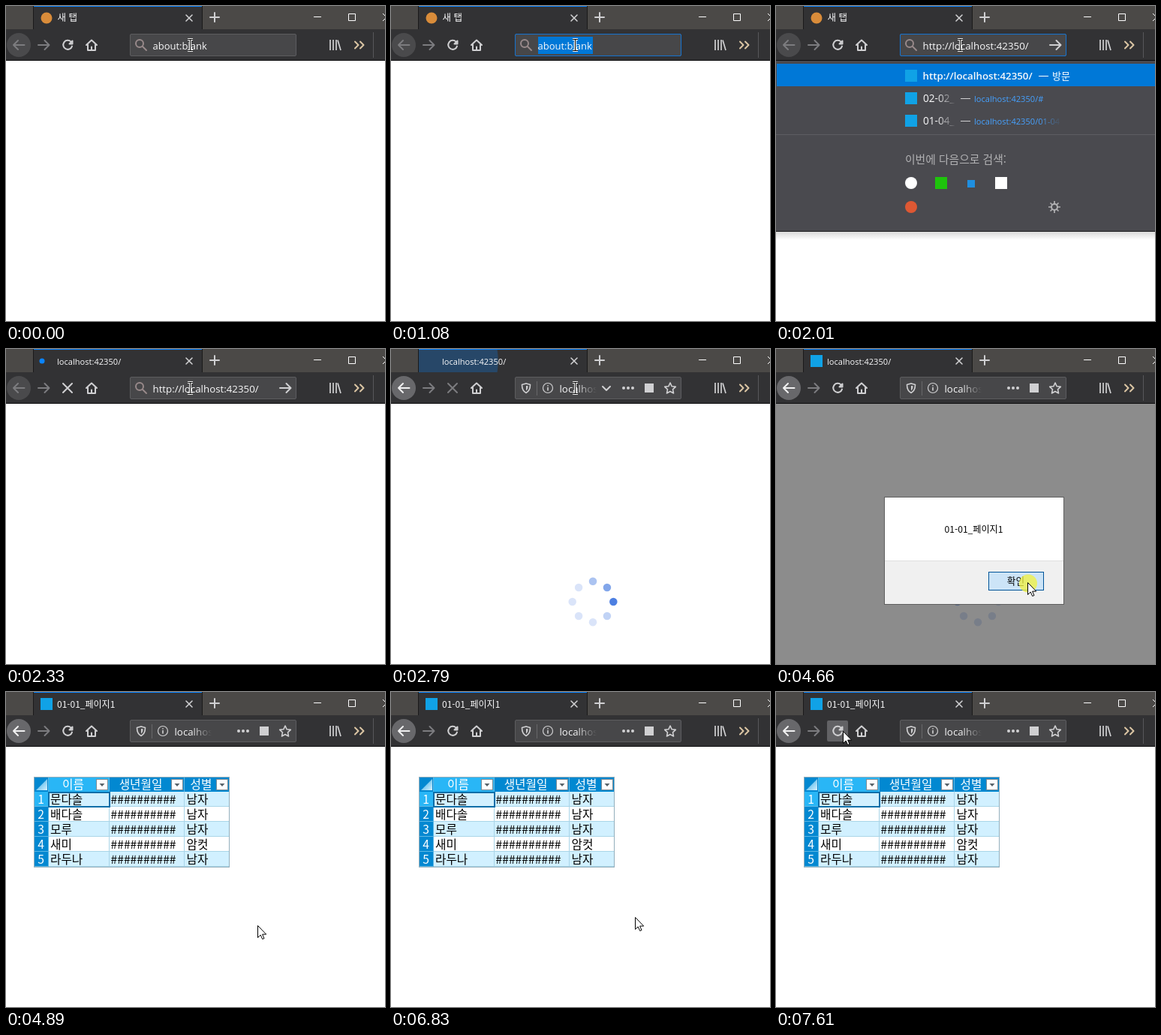
Animation of 505x420 px, one loop 8 s. Source, as an HTML page:

```html
<!DOCTYPE html>
<html lang="ko">
<head>
<meta charset="utf-8">
<title>Browser demo</title>
<style>
  html, body { margin: 0; width: 100%; height: 100%; overflow: hidden; background: #fff; }
  svg { display: block; }
  text { font-family: "Noto Sans CJK KR", "Noto Sans CJK", sans-serif; white-space: pre; }
  .url { font: 13px "Open Sans", "Noto Sans", sans-serif; fill: #f9f9fa; }
  .addr { font-size: 13.3px; }
  .small { font: 11.1px "Open Sans", "Noto Sans", sans-serif; }
  .tab { font-size: 12px; fill: #f9f9fa; }
  .tab.small { font-size: 11.1px; }
  .icon { fill: none; stroke: #d0d0d2; stroke-width: 2; stroke-linecap: round; stroke-linejoin: round; }
  .dim { stroke: #7c7c7f; }
  .brand { fill: #10a2e6; }
  .cell { font-size: 15.7px; }
  .mid { text-anchor: middle; }
</style>
</head>
<body>
<svg width="505" height="420" viewBox="0 0 505 420">
  <defs>
    <linearGradient id="fadeUrl" gradientUnits="userSpaceOnUse" x1="246" x2="274">
      <stop stop-color="#f9f9fa"/><stop offset="1" stop-color="#f9f9fa" stop-opacity="0"/>
    </linearGradient>
    <linearGradient id="fadeTitle" gradientUnits="userSpaceOnUse" x1="214" x2="240">
      <stop stop-color="#f9f9fa"/><stop offset="1" stop-color="#f9f9fa" stop-opacity="0"/>
    </linearGradient>
    <linearGradient id="fadeLink" gradientUnits="userSpaceOnUse" x1="350" x2="381">
      <stop stop-color="#45a1ff"/><stop offset="1" stop-color="#45a1ff" stop-opacity="0"/>
    </linearGradient>
    <linearGradient id="shade" x2="0" y2="1">
      <stop stop-opacity=".15"/><stop offset="1" stop-opacity="0"/>
    </linearGradient>
    <linearGradient id="corner" x2="1" y2="1">
      <stop offset=".3" stop-color="#5cbcec"/><stop offset="1" stop-color="#d8f1fd"/>
    </linearGradient>
    <clipPath id="tabClip"><rect x="37" y="1" width="224" height="30"/></clipPath>
    <path id="reload" d="M86.5 47.600A6 6 0 1 0 88 53.600M88.500 46.500V50.500H84.500Z"/>
  </defs>

  <!-- page -->
  <rect width="505" height="420" fill="#fff"/>
  <g id="spinner" data-on="2500 4890"></g>
  <g id="table" data-on="4890 8000"></g>

  <!-- window frame -->
  <rect width="505" height="31" fill="#4b4947"/>
  <rect y="31" width="505" height="41" fill="#323234"/>
  <rect y="72" width="505" height="1" fill="#0c0c0d"/>
  <path d="M36.500 0V31M261.500 0V31" stroke="#1b1a1a"/>
  <rect x="37" width="224" height="31" fill="#323234"/>
  <circle id="burst" cx="54" cy="16" fill="#0a84ff" clip-path="url(#tabClip)"/>
  <rect x="37" width="224" height="1" fill="#0a84ff"/>
  <g data-on="0 2330">
    <circle cx="54" cy="16" r="7.500" fill="#d98c3a"/>
    <text class="tab" x="68.500" y="20.300" style="font-size:12.500px">새 탭</text>
  </g>
  <circle id="throbber" data-on="2330 2700" cy="16" r="3.500" fill="#0a84ff"/>
  <text class="tab small" data-on="2330 4890" x="68" y="20.500">localhost:42350/</text>
  <text class="tab" data-on="4890 8000" x="68" y="20.500">01-01_페이지1</text>
  <rect class="brand" data-on="3060 8000" x="46" y="8" width="16" height="16"/>
  <path class="icon" style="stroke-width:1.600" d="M240 12L248 20M248 12L240 20"/>
  <path class="icon" d="M278 9V21M272 15H284"/>
  <path d="M410 14.500H420M456.500 10.500H465.500V19.500H456.500ZM502 10L512 20M502 20L512 10" fill="none" stroke="#fff"/>

  <!-- toolbar -->
  <g data-on="0 2400">
    <circle cx="17" cy="52" r="16" fill="#4a4a4c"/>
    <path class="icon dim" d="M24.500 52H10M16 46L10 52L16 58"/>
  </g>
  <g data-on="2400 8000">
    <circle cx="17" cy="52" r="16" fill="#68686b"/>
    <path class="icon" style="stroke:#f0f0f1" d="M24.500 52H10M16 46L10 52L16 58"/>
  </g>
  <path class="icon dim" d="M43 52H57M51.500 46L57.500 52L51.500 58"/>
  <rect data-on="7380 8000" x="68" y="38" width="28" height="28" rx="2" fill="#626265"/>
  <use href="#reload" class="icon" data-on="0 2330 3380 8000"/>
  <use href="#reload" class="icon dim" data-on="3190 3380"/>
  <path class="icon" data-on="2330 2700" d="M76 46L88 58M88 46L76 58"/>
  <path class="icon dim" data-on="2700 3190" d="M76 46L88 58M88 46L76 58"/>
  <path class="icon" d="M107 52L114 45.500L121 52M109 51.500V59H119V51.500M114 58.500V54.500"/>
  <path class="icon" style="stroke-linecap:butt;stroke-width:1.700" d="M432 45V59M436 45V59M440 45V59M442 45.500L446 59"/>
  <path class="icon" style="stroke:#dcc6a4" d="M465 47.500L469.500 52L465 56.500M472 47.500L476.500 52L472 56.500"/>
  <path d="M489.500 35V69" stroke="#57575a"/>

  <!-- address field -->
  <rect x="165.500" y="37.500" width="221" height="29" rx="1.500" fill="#474749" stroke="#5c5c5f"/>
  <rect data-on="910 2330" x="165.500" y="37.500" width="221" height="29" rx="1.500" fill="none" stroke="#1573cf"/>
  <g data-on="0 2400">
    <g class="icon" style="stroke:#98898a"><circle cx="178" cy="50" r="5"/><path d="M182 54L187 59"/></g>
    <rect data-on="1080 1610" x="196" y="41" width="73" height="23" fill="#0078d7"/>
    <text class="url" data-on="0 1610" x="195.500" y="57.800">about:blank</text>
    <text class="url addr" data-on="1610 2400" x="195.500" y="57.800">http://localhost:42350/</text>
    <path data-on="1610 2010" d="M337.500 43V61" stroke="#fff"/>
    <path class="icon" data-on="1610 2400" d="M365 52H379M373.500 46L379.500 52L373.500 58"/>
  </g>
  <g data-on="2400 8000">
    <g class="icon" style="stroke-width:1.600">
      <path d="M180 46L185.500 47.500C185.500 53 184 56.500 180 58.500C176 56.500 174.500 53 174.500 47.500Z"/>
      <path d="M180 49V55.500C182 54 182.500 52 182.500 49.300Z" fill="#d0d0d2" stroke="none"/>
      <circle cx="209" cy="52" r="6.500" style="stroke-width:1.200"/><path d="M209 51.500V55M209 48.800V49"/>
      <path d="M372 45L374.200 49.800L379.300 50.400L375.500 53.900L376.500 59L372 56.500L367.500 59L368.500 53.900L364.700 50.400L369.800 49.800Z"/>
      <path data-on="2400 3800" style="stroke-width:2" d="M282 50L287 55L292 50"/>
    </g>
    <path d="M194.500 43V62" stroke="#67676a"/>
    <g fill="#d0d0d2">
      <circle cx="310" cy="52" r="2"/><circle cx="316" cy="52" r="2"/><circle cx="322" cy="52" r="2"/>
      <rect x="338" y="46" width="12" height="12"/>
    </g>
    <text class="url addr" x="224.500" y="57.800" style="fill:url(#fadeUrl)">localhos</text>
  </g>

  <!-- suggestions -->
  <g data-on="1610 2330">
    <rect y="301" width="505" height="11" fill="url(#shade)"/>
    <rect y="73" width="505" height="228" fill="#4a4a4f"/>
    <rect y="300" width="505" height="1" fill="#1c1c1e"/>
    <rect x="1" y="77" width="504" height="30" fill="#0078d7"/>
    <rect class="brand" x="172" y="85" width="16" height="16"/>
    <text class="url" x="195.500" y="97.800" style="font-size:13.300px;font-weight:600">http://localhost:42350/</text>
    <path d="M350 93.500H363" stroke="#fff"/>
    <text x="368" y="97.500" font-size="13" fill="#fff">방문</text>
    <g data-on="1690 2330">
      <rect class="brand" x="172" y="115" width="16" height="16"/>
      <rect class="brand" x="172" y="145" width="16" height="16"/>
      <text class="url" x="196" y="127.800" style="font-size:13.600px;fill:url(#fadeTitle)">02-02_</text>
      <text class="url" x="196" y="157.800" style="font-size:13.600px;fill:url(#fadeTitle)">01-04_</text>
      <path d="M246 123.500H259M246 153.500H259" stroke="#d0d0d2"/>
      <text class="small" x="264" y="127.800" fill="#45a1ff">localhost:42350/#</text>
      <text class="small" x="264" y="157.800" fill="url(#fadeLink)">localhost:42350/01-04</text>
    </g>
    <rect y="171" width="505" height="1" fill="#5d5d62"/>
    <text x="172" y="209.500" font-size="14.800" fill="#b1b1b3">이번에 다음으로 검색:</text>
    <circle cx="180" cy="236" r="8" fill="#fff"/>
    <rect x="212" y="228" width="16" height="16" fill="#1ec40c"/>
    <rect x="255" y="232" width="10" height="10" fill="#1f8fe0"/>
    <rect x="292" y="228" width="16" height="16" fill="#fff"/>
    <circle cx="180" cy="268" r="8" fill="#de5833"/>
    <g fill="none" stroke="#b1b1b3" stroke-width="2">
      <circle cx="371" cy="268" r="4"/>
      <path d="M371 260V264M371 272V276M363 268H367M375 268H379M365.500 262.500L368 265M374 271L376.500 273.500M376.500 262.500L374 265M368 271L365.500 273.500" stroke-width="1.700"/>
    </g>
  </g>

  <!-- alert -->
  <g data-on="3060 4830">
    <rect y="73" width="505" height="347" fill="#000" opacity=".45"/>
    <rect x="144.500" y="197.500" width="239" height="143" fill="#fff" stroke="#5f5f5f"/>
    <rect x="145" y="282" width="238" height="58" fill="#f0f0f0"/>
    <rect x="145" y="282" width="238" height="1" fill="#dfdfdf"/>
    <text class="mid" x="263.500" y="245" font-size="12.100">01-01_페이지1</text>
    <rect data-on="3060 4380" x="284" y="298" width="72" height="23" fill="#e1e1e1" stroke="#0078d7" stroke-width="2"/>
    <rect data-on="4380 4570" x="283.500" y="297.500" width="73" height="24" fill="#e5f1fb" stroke="#0078d7"/>
    <rect data-on="4570 4830" x="283.500" y="297.500" width="73" height="24" fill="#cce4f7" stroke="#005499"/>
    <text class="mid" x="319.500" y="313.700" font-size="12.700">확인</text>
  </g>

  <!-- pointer -->
  <circle data-on="4570 4890" cx="336" cy="312.500" r="12" fill="#f2f23c" opacity=".75"/>
  <g data-on="0 3800" fill="none">
    <path d="M242 44.500H249M242 59.500H249M245.500 44.500V59.500" stroke="#fff" stroke-width="3"/>
    <path d="M242 44.500H249M242 59.500H249M245.500 44.500V59.500" stroke="#000"/>
  </g>
  <path id="arrow" data-on="3800 8000" d="M.5 .5V16.500L4.200 13L6.700 18.500L9 17.500L6.600 12.100H11.700Z" fill="#fff" stroke="#000"/>
</svg>

<script>
const LOOP = 8000;
const $ = id => document.getElementById(id);
const clamp = v => Math.min(1, Math.max(0, v));

// Data grid
const BLUE = '#0288d1', LIGHT = '#29b6f6', EDGE = '#5fb8e4', GRID = '#a9d5e8';
const rect = (x, y, w, h, fill) => `<rect x="${x}" y="${y}" width="${w}" height="${h}" fill="${fill}"/>`;
const label = (x, y, s, attrs = '') => `<text class="cell" x="${x}" y="${y}" ${attrs}>${s}</text>`;
const WHITE_MID = 'text-anchor="middle" fill="#fff"';

function buildTable() {
  const people = [['문다솔', '남자'], ['배다솔', '남자'], ['모루', '남자'], ['새미', '암컷'], ['라두나', '남자']];
  const columns = [['이름', 57, 80, 89.5], ['생년월일', 138, 99, 179.5], ['성별', 238, 59, 260]];
  let out = rect(37, 113, 261, 121, EDGE) + rect(38, 114, 18, 19, BLUE)
    + '<path d="M55 116V131H40Z" fill="url(#corner)"/>';
  columns.forEach(([name, x, w, mid], i) => {
    const fx = x + w - 17;
    out += rect(x, 114, w, 19, i ? BLUE : LIGHT) + label(mid, 129.4, name, WHITE_MID)
      + `<rect x="${fx + .5}" y="116.500" width="15" height="14" fill="#fff" stroke="#7d8a92"/>`
      + `<path d="M${fx + 4.5} 122H${fx + 11.5}L${fx + 8} 126Z" fill="#59636a"/>`;
  });
  people.forEach(([name, sex], i) => {
    const y = 133 + i * 20, base = y + 16.2;
    out += rect(38, y, 18, 19, i ? BLUE : LIGHT) + label(46.5, base, i + 1, WHITE_MID);
    for (const [, x, w] of columns) out += rect(x, y, w, 20, i % 2 ? '#fff' : '#d1f0ff');
    out += rect(57, y + 19, 240, 1, GRID) + rect(137, y, 1, 20, GRID) + rect(237, y, 1, 20, GRID)
      + label(59, base, name) + label(139.5, base, '##########') + label(240.5, base, sex);
  });
  out += '<rect x="57" y="134" width="81" height="19" fill="none" stroke="#0b6ea8" stroke-width="2"/>'
    + '<rect x="37.500" y="113.500" width="260" height="120" fill="none" stroke="#93aebb"/>';
  $('table').innerHTML = out;
}

// Ring of eight dots with a bright head and two trailing tones
const EM = 10.5;
const TONES = [1, .2, .2, .2, .2, .2, .5, .7];
function buildSpinner() {
  for (let i = 0; i < 8; i++) {
    const a = i * Math.PI / 4, r = EM * (i % 2 ? 2.55 : 2.6);
    $('spinner').innerHTML += `<circle cx="${269 + r * Math.sin(a)}" cy="${337 - r * Math.cos(a)}" r="${EM / 2}" fill="#4479e0"/>`;
  }
}
function drawSpinner(t) {
  const pos = Math.max(0, t - (t < 3060 ? 2500 : 2450)) / 137.5;
  const step = Math.floor(pos);
  const ease = 1 - (1 - (pos - step) ** 1.3) ** 2.8;
  [...$('spinner').children].forEach((dot, i) => {
    const from = TONES[(i - step + 800) % 8], to = TONES[(i - step + 799) % 8];
    dot.setAttribute('opacity', from + (to - from) * ease);
  });
}

// Pointer moves advance in even steps along an eased line
function travel(t, start, end, steps, from, to) {
  const n = Math.floor((t - start) / ((end - start) / (steps - 1)) + 1e-6) + 1;
  const p = clamp(n / steps), e = p * p * (3 - 2 * p);
  return from.map((v, i) => Math.round(v + (to[i] - v) * e));
}
function pointerAt(t) {
  if (t < 6830) return travel(t, 3730, 4420, 10, [245, 52], [335, 311]);
  if (t < 7610) return travel(t, 6830, 7380, 8, [335, 311], [92, 52]);
  return [89, 52];
}

function drawLoading(t) {
  const age = t - 2700;
  $('burst').setAttribute('r', clamp(age / 250) * 244);
  $('burst').setAttribute('opacity', age > 0 ? .4 * clamp(1 - age / 250) : 0);
  $('throbber').setAttribute('cx', 54 - 6 * Math.cos((t - 2330) / 150));
}

buildTable();
buildSpinner();
const timed = [...document.querySelectorAll('[data-on]')]
  .map(el => ({ el, spans: el.dataset.on.split(' ').map(Number) }));

function draw(t) {
  for (const { el, spans } of timed) {
    const on = spans.filter(s => s <= t).length % 2;
    el.style.display = on ? '' : 'none';
  }
  drawSpinner(t);
  drawLoading(t);
  $('arrow').setAttribute('transform', `translate(${pointerAt(t)})`);
}

const begin = performance.now();
function tick() {
  draw((performance.now() - begin) % LOOP);
  requestAnimationFrame(tick);
}
tick();
</script>
</body>
</html>
```
